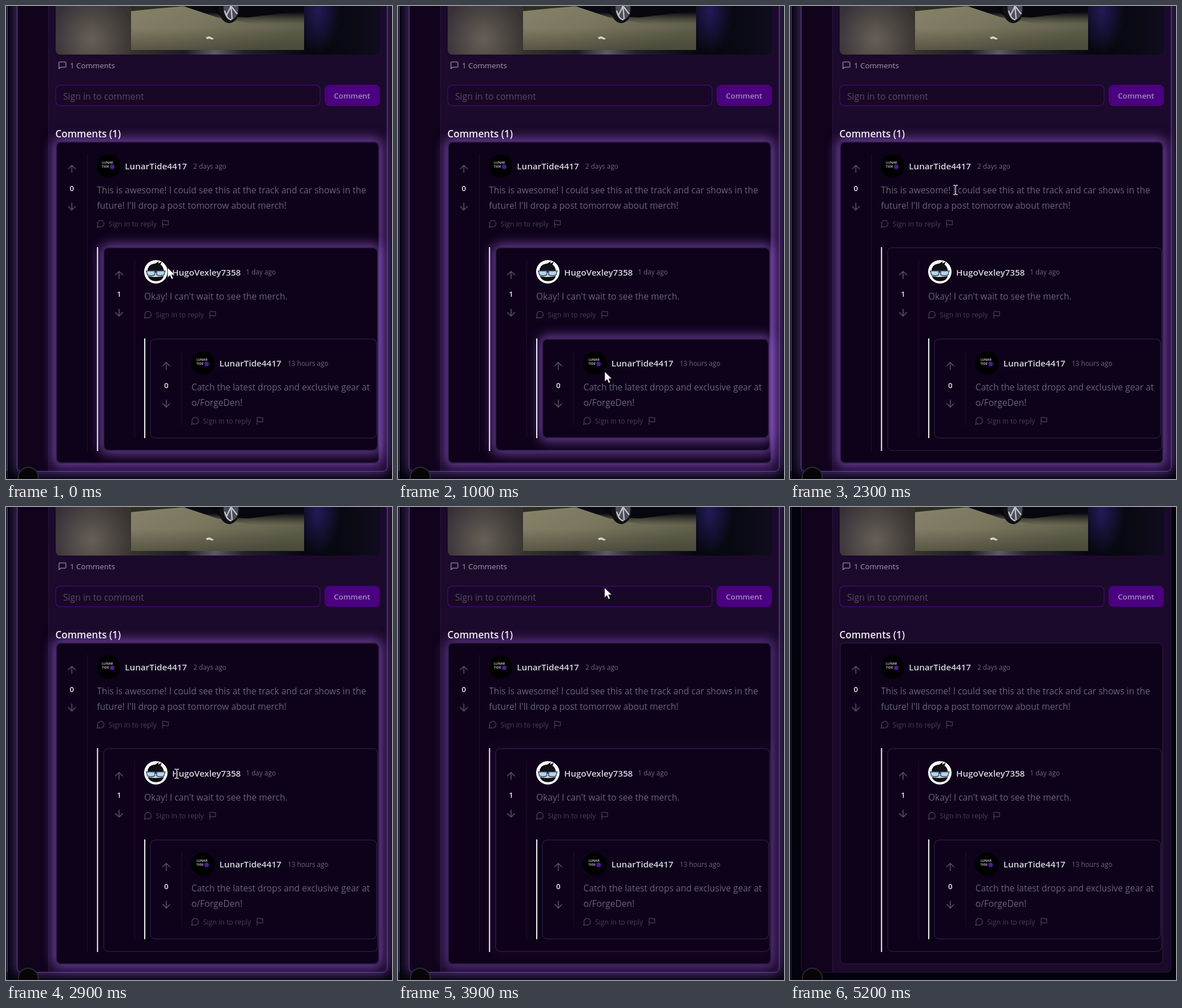
Recreate the animation shown at these times as an HTML page. Size 676 px wide and 828 px high, loop 5.3 s.

```html
<!DOCTYPE html>
<html lang="en">
<head>
<meta charset="utf-8">
<title>Nested comments</title>
<style>
  html, body { margin: 0; width: 676px; height: 828px; overflow: hidden; background: #02020b; }
  #stage { position: relative; width: 676px; height: 828px; overflow: hidden; }
  #stage > * { position: absolute; box-sizing: border-box; }
  svg { left: 0; top: 0; }
  text { font-family: "Open Sans", "Noto Sans", sans-serif; white-space: pre; }
  .edge { left: 1px; top: 0; width: 2px; height: 828px; background: #1c1a25; }
  .panel { left: 19px; top: -40px; width: 649px; height: 855px; border-radius: 8px; }
  .page { background: linear-gradient(90deg, #10031b 54px, #281539 54px, #281539 55px, #1b0a2b 55px); border: 1px solid #271536; }
  .panel.glow { border: 1px solid #63408c; box-shadow: 0 0 20px 4px rgba(118, 74, 172, .6), inset 0 0 7px rgba(110, 60, 170, .18); }
  .panel.glow::before { content: ""; position: absolute; left: -19px; top: 0; width: 2px; height: 100%; background: #46375a; }
  .card { border: 2px solid #231334; border-radius: 9px; background: #0e021a; }
  .card.glow { background: none; border-color: #352050; box-shadow: 0 0 20px 5px rgba(138, 86, 198, .72); }
  .name { fill: #d9d5de; font-weight: 600; font-size: 15.2px; }
  .time { fill: #6c6577; font-size: 11.7px; }
  .body { fill: #6a6376; font-size: 15.5px; }
  .reply { fill: #493f55; font-size: 12.25px; }
  .count { fill: #eeeaf2; font-weight: 600; font-size: 13.2px; text-anchor: middle; }
  .icon { fill: none; stroke-width: 2; stroke-linecap: round; stroke-linejoin: round; }
</style>
</head>
<body>
<div id="stage">
  <div class="edge"></div>
  <div class="panel page"></div>
  <div class="panel glow"></div>

  <svg id="art" width="676" height="828" viewBox="0 0 676 828">
    <defs>
      <linearGradient id="blur">
        <stop offset="0" stop-color="#363038"/><stop offset=".23" stop-color="#37332f"/>
        <stop offset=".4" stop-color="#1d1d26"/><stop offset=".49" stop-color="#5d5a66"/>
        <stop offset=".58" stop-color="#22222c"/><stop offset=".77" stop-color="#07070f"/>
        <stop offset=".9" stop-color="#090913"/><stop offset="1" stop-color="#100c1d"/>
      </linearGradient>
      <radialGradient id="haze">
        <stop offset="0" stop-color="#665f57"/><stop offset="1" stop-color="#665f57" stop-opacity="0"/>
      </radialGradient>
      <radialGradient id="neon">
        <stop offset="0" stop-color="#231a58"/><stop offset="1" stop-color="#231a58" stop-opacity="0"/>
      </radialGradient>
      <linearGradient id="sand" y2=".5">
        <stop offset="0" stop-color="#87826a"/><stop offset=".45" stop-color="#7b775f"/>
        <stop offset="1" stop-color="#5f5e4a"/>
      </linearGradient>
      <linearGradient id="shade" x2="0" y2="1">
        <stop offset=".35" stop-color="#0a0b12"/><stop offset="1" stop-color="#2b2c24" stop-opacity="0"/>
      </linearGradient>
      <linearGradient id="dusk" x2="0" y2="1">
        <stop offset=".5" stop-color="#35342a" stop-opacity="0"/><stop offset="1" stop-color="#35342a" stop-opacity=".5"/>
      </linearGradient>
      <clipPath id="frame"><path d="M87 0H655V76q0 9-9 9H96q-9 0-9-9z"/></clipPath>
    </defs>
    <g clip-path="url(#frame)">
      <path fill="url(#blur)" d="M87 0H655V85H87z"/>
      <ellipse cx="150" cy="58" rx="75" ry="80" fill="url(#haze)"/>
      <ellipse cx="546" cy="8" rx="40" ry="75" fill="url(#neon)"/>
      <path fill="url(#sand)" d="M219 0H522V77H219z"/>
      <path fill="url(#dusk)" d="M219 0H522V77H219z"/>
      <path fill="#2a2f22" d="M219 0H318L268 4 219 9z"/>
      <path fill="url(#shade)" d="M310 0H522V32L430 31 370 20z"/>
      <path fill="#07080e" d="M355 0H522V8L424 20 376 18z"/>
      <ellipse cx="391" cy="5" rx="18" ry="25" fill="#101116"/>
      <ellipse cx="394" cy="4" rx="13" ry="20" fill="#4a4c55"/>
      <path fill="none" stroke="#bfc0c8" stroke-width="2.4" d="M394 0L386 17M394 0L396 23M394 0L405 14M383 8q4 16 12 16"/>
      <path fill="#d7d3c6" d="M350 55l6-2 8 4-3 2-5-2-4 1z"/>
    </g>
    <g class="icon" stroke="#938c9d" transform="translate(90.8 95.8) scale(.67)">
      <path d="M21 15a2 2 0 0 1-2 2H7l-4 4V5a2 2 0 0 1 2-2h14a2 2 0 0 1 2 2z"/>
    </g>
    <text x="112" y="109" font-size="13.3" fill="#a29bac">1 Comments</text>
    <rect x="87" y="138.500" width="463" height="36" rx="8" fill="#190728" stroke="#40096c" stroke-width="1.4"/>
    <text x="100" y="163.500" font-size="15.7" fill="#574a66">Sign in to comment</text>
    <rect x="558" y="138" width="97" height="37" rx="8" fill="#4a0080"/>
    <text x="606" y="162" font-size="13.4" font-weight="600" fill="#a58cba" text-anchor="middle">Comment</text>
  </svg>
</div>

<script>
const LOOP = 5300, STEP = 100;
const stage = document.getElementById('stage');
const glows = [document.querySelector('.panel.glow')];

// Boxes are x, y, width, height; dx and dy move the comment content.
const comments = [
  { box: [87, 237, 567, 564], dx: 0, dy: 0, end: 779, votes: 0, user: 'LunarTide4417', ago: '2 days ago', agoX: 328,
    lines: ['This is awesome! I could see this at the track and car shows in the', "future! I'll drop a post tomorrow about merch!"] },
  { box: [169.5, 422, 482.5, 357], dx: 82.7, dy: 185.7, end: 756, votes: 1, user: 'HugoVexley7358', ago: '1 day ago', agoX: 337.5,
    lines: ["Okay! I can't wait to see the merch."] },
  { box: [252, 582, 398, 174.5], dx: 165.4, dy: 345, end: 735, votes: 0, user: 'LunarTide4417', ago: '13 hours ago', agoX: 328,
    lines: ['Catch the latest drops and exclusive gear at', 'o/ForgeDen!'] }
];

function addBox(cls, [x, y, w, h]) {
  const el = document.createElement('div');
  el.className = cls;
  el.style.cssText = `left:${x}px;top:${y}px;width:${w}px;height:${h}px`;
  stage.append(el);
  return el;
}

function addSvg(markup) {
  stage.insertAdjacentHTML('beforeend', `<svg width="676" height="828" viewBox="0 0 676 828">${markup}</svg>`);
  return stage.lastElementChild;
}

const text = (cls, x, y, s) => `<text class="${cls}" x="${x}" y="${y}">${s}</text>`;
const icon = (x, y, k, color, d) =>
  `<path class="icon" stroke="${color}" transform="translate(${x} ${y}) scale(${k}) translate(-12 -12)" d="${d}"/>`;

const crewAvatar = `
  <circle cx="179.500" cy="280" r="20.500" fill="#000"/>
  <g font-size="5.8" font-weight="600" fill="#e4e4ea">
    <text x="168" y="276">LUNAR</text><text x="168" y="283">TIDE</text>
  </g>
  <circle cx="186" cy="281.500" r="4" fill="#4a1c9c"/>`;

const faceAvatar = `
  <circle cx="179.700" cy="279.500" r="20.500" fill="#fff"/>
  <path fill="#101014" d="M165 281q-1-15 14-16l6-4-1 4 6-3-2 5q6 4 6 14v4q-2 11-14 11t-15-11z"/>
  <path fill="#e9e6e2" d="M166 281h27v6q-13 3-27 0z"/>
  <path fill="#b5d4ea" stroke="#34506b" stroke-width="1.500" d="M163 278h15v7q-7 3-13 0zM181 278h15l-2 7q-6 3-13 0z"/>
  <path stroke="#34506b" stroke-width="2" d="M177 280h5"/>`;

function content(c) {
  const last = 328 + (c.lines.length - 1) * 26.5, row = last + 27.5;
  return `<g transform="translate(${c.dx} ${c.dy})">
    <path stroke="#20112f" d="M142.500 259V${c.end - c.dy}"/>
    ${icon(115.3, 285, .88, '#514a5c', 'M5 12l7-7 7 7M12 19V5')}
    ${text('count', 115.3, 323.5, c.votes)}
    ${icon(115.3, 351, .88, '#514a5c', 'M5 12l7 7 7-7M12 5v14')}
    ${c.votes ? faceAvatar : crewAvatar}
    ${text('name', 208.3, 286, c.user)}
    ${text('time', c.agoX, 284.5, c.ago)}
    ${c.lines.map((s, i) => text('body', 159.3, 328 + i * 26.5, s)).join('')}
    ${icon(166, row - 1, .64, '#4a4156', 'M7.900 20A9 9 0 1 0 4 16.100L2 22z')}
    ${text('reply', 179.5, row + 3.5, 'Sign in to reply')}
    ${icon(279.3, row - 1, .62, '#4a4156', 'M4 15s1-1 4-1 5 2 8 2 4-1 4-1V3s-1 1-4 1-5-2-8-2-4 1-4 1zM4 22V15')}
  </g>`;
}

for (const c of comments) {
  addBox('card', c.box);
  glows.push(addBox('card glow', c.box));
}

addSvg(`
  <text x="86.500" y="229.500" font-size="17.100" font-weight="600" fill="#efecf2">Comments (1)</text>
  <path stroke="#f4f1f6" stroke-width="2" d="M160.300 422V779M243 582V756.500"/>
  ${comments.map(content).join('')}
  <circle cx="39" cy="825" r="17.500" fill="#050507" stroke="#2b2830" stroke-width="2"/>`);

const pointer = addSvg(`
  <path id="arrow" fill="#fff" stroke="#15101c" stroke-width=".8" d="M0 0V17.500L4.200 13.700 7 20.200 9.900 19 7.100 12.600H12.800z"/>
  <g id="beam" fill="none" stroke-linecap="square">
    <path stroke="#17121d" stroke-width="3" d="M-3-8H-1.500L0-7 1.500-8H3M0-7V7M-3 8H-1.500L0 7 1.500 8H3"/>
    <path stroke="#e9e7ec" stroke-width="1.300" d="M-3-8H-1.500L0-7 1.500-8H3M0-7V7M-3 8H-1.500L0 7 1.500 8H3"/>
  </g>`);
pointer.style.overflow = 'visible';
const arrow = document.getElementById('arrow'), beam = document.getElementById('beam');

// Each track lists [time, value...].
const levels = [
  [[0, 1], [4300, 1], [4700, 0]],
  [[0, 1], [3800, 1], [4100, 0]],
  [[0, 1], [1900, 1], [2200, 0], [2900, 0], [3200, 1], [3700, 1], [3950, 0]],
  [[0, 0], [400, 0], [700, 1], [1400, 1], [1700, 0], [3050, 0], [3350, 1], [3600, 1], [3850, 0]]
];
const path = [[0, 283, 458], [200, 283, 458], [700, 362, 640], [1200, 362, 640], [1700, 283, 446],
  [1850, 283, 445], [2300, 290, 322], [2600, 296, 322], [2900, 299, 467], [3400, 372, 659],
  [3500, 372, 659], [4100, 358, -40]];

function sample(track, t, ease) {
  const i = track.findIndex(k => k[0] > t);
  if (i < 0) return track[track.length - 1].slice(1);
  const a = track[i - 1], b = track[i], p = ease((t - a[0]) / (b[0] - a[0]));
  return a.slice(1).map((v, n) => v + (b[n + 1] - v) * p);
}

const smooth = p => p * p * (3 - 2 * p);

function overText(x, y) {
  return comments.some(c => {
    const u = x - c.dx, v = y - c.dy;
    const inName = u > 207 && u < 386 && v > 268 && v < 292;
    const inBody = u > 159 && x < 640 && v > 309 && v < 309 + c.lines.length * 26.5;
    return inName || inBody;
  });
}

function draw(now) {
  const t = Math.floor(now % LOOP / STEP) * STEP;
  glows.forEach((g, i) => { g.style.opacity = sample(levels[i], t, smooth)[0]; });
  const [x, y] = sample(path, t, smooth);
  const typing = overText(x, y);
  pointer.style.transform = `translate(${x}px, ${y}px)`;
  arrow.style.display = typing ? 'none' : '';
  beam.style.display = typing ? '' : 'none';
}

const start = performance.now();
function tick() {
  draw(performance.now() - start);
  requestAnimationFrame(tick);
}
tick();
</script>
</body>
</html>
```
